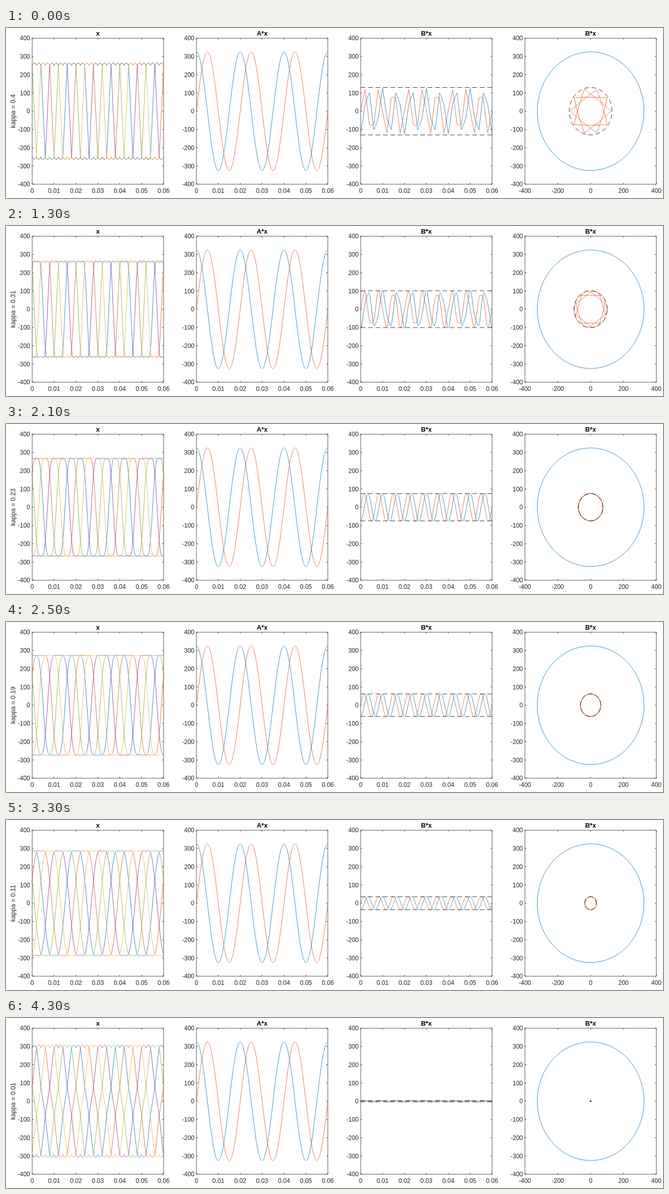
Recreate the animation shown at these times as an HTML page. Size 1280 by 333 pixels, loop 4400 ms.

```html
<!DOCTYPE html>
<html lang="en">
<head>
<meta charset="utf-8">
<title>Five-phase limits</title>
<style>
html, body { margin: 0; width: 100%; height: 100%; overflow: hidden; background: #fff; }
svg { display: block; width: 100vw; height: 100vh; }
text { font: 12px "Liberation Sans", Arial, sans-serif; fill: #262626; }
.title { font-weight: bold; font-size: 12.6px; fill: #000; }
.label { font-size: 12.6px; }
path { fill: none; stroke-width: .8; stroke-linejoin: round; }
.axis { stroke: #262626; stroke-linejoin: miter; }
.limit { stroke: #000; stroke-dasharray: 9 5.5; }
</style>
</head>
<body>
<svg id="stage" viewBox="0 0 1280 333"></svg>
<script>
const AMP = 325, N = 200, CYCLES = 3;
const TAU = 2 * Math.PI, SECTOR = TAU / 10;
const TOP = 20, MID = 163, BOTTOM = 306, WIDTH = 256;
const LEFT = [51, 371, 691, 1011];
const COLORS = ['#0072BD', '#D95319', '#EDB120', '#7E2F8E', '#77AC30'];
const PHASES = [0, 1, 2, 3, 4];
const stage = document.getElementById('stage');

function add(tag, attrs, text = '') {
  const el = document.createElementNS('http://www.w3.org/2000/svg', tag);
  for (const key in attrs) el.setAttribute(key, attrs[key]);
  el.textContent = text;
  return stage.appendChild(el);
}

const yPos = v => MID - v * 143 / 400;
const xPos = v => LEFT[3] + WIDTH / 2 + v * 0.32;
const polyline = pts => 'M' + pts.map(p => p[0].toFixed(2) + ' ' + p[1].toFixed(2)).join('L');

function ellipse(r) {
  const rx = r * 0.32, ry = r * 143 / 400;
  return `M${xPos(r)} ${MID}a${rx} ${ry} 0 1 0 ${-2 * rx} 0a${rx} ${ry} 0 1 0 ${2 * rx} 0`;
}

// Curve over time; samples hold one cycle and repeat.
function timePath(panel, value) {
  const pts = [];
  for (let i = 0; i <= N * CYCLES; i++)
    pts.push([LEFT[panel] + WIDTH * i / (N * CYCLES), yPos(value(i % N))]);
  return polyline(pts);
}

// Smallest peak of the five phases with no limit on B*x.
function freeSolution(theta) {
  const normal = (Math.floor(theta / SECTOR) + 0.5) * SECTOR;
  const dots = PHASES.map(k => Math.cos(TAU * k / 5 - normal));
  const sum = dots.reduce((s, d) => s + Math.abs(d), 0);
  const peak = AMP * Math.cos(theta - normal) / (0.4 * sum);
  return dots.map((d, k) => Math.abs(d) < 1e-6
    ? AMP * Math.sin(theta - normal) / 0.4 * Math.sin(TAU * k / 5 - normal)
    : peak * Math.sign(d));
}

function project(x) {
  let re = 0, im = 0;
  x.forEach((v, k) => {
    re += 0.4 * v * Math.cos(2 * TAU * k / 5);
    im += 0.4 * v * Math.sin(2 * TAU * k / 5);
  });
  return [re, im];
}

// Radius of the free B*x star at the middle of a sector.
const INNER = Math.hypot(...project(freeSolution(SECTOR / 2)));

// Phases for a B*x vector on the limit circle, centred about zero.
function onCircle(theta, r, phi) {
  const x = PHASES.map(k =>
    AMP * Math.cos(theta - TAU * k / 5) + r * Math.cos(phi - 2 * TAU * k / 5));
  const hi = Math.max(...x), lo = Math.min(...x);
  return { x: x.map(v => v - (hi + lo) / 2), peak: (hi - lo) / 2 };
}

function bestAngle(theta, r) {
  const peak = phi => onCircle(theta, r, phi).peak;
  const step = TAU / 60;
  let best = 0, least = Infinity;
  for (let i = 0; i < 60; i++) {
    const p = peak(i * step);
    if (p < least) { least = p; best = i * step; }
  }
  let lo = best - step, hi = best + step;
  for (let i = 0; i < 24; i++) {
    const third = (hi - lo) / 3;
    if (peak(lo + third) < peak(hi - third)) hi -= third;
    else lo += third;
  }
  return (lo + hi) / 2;
}

// Inside the star's inner radius the vector turns evenly, backwards at triple speed.
function solve(theta, r) {
  const x = freeSolution(theta), b = project(x);
  if (Math.hypot(...b) <= r) return { x, b };
  const phi = r < INNER ? Math.PI - 3 * theta : bestAngle(theta, r);
  return { x: onCircle(theta, r, phi).x, b: [r * Math.cos(phi), r * Math.sin(phi)] };
}

function drawAxes(panel, title) {
  const x0 = LEFT[panel], x1 = x0 + WIDTH;
  let d = `M${x0} ${TOP}H${x1}V${BOTTOM}H${x0}Z`;
  for (let v = -400; v <= 400; v += 100) {
    const y = yPos(v);
    d += `M${x0} ${y}h3M${x1} ${y}h-3`;
    add('text', { x: x0 - 4, y: y + 4.4, 'text-anchor': 'end' }, v);
  }
  const xy = panel === 3;
  const count = xy ? 4 : 6;
  for (let i = 0; i <= count; i++) {
    const x = x0 + WIDTH * i / count;
    d += `M${x} ${TOP}v3M${x} ${BOTTOM}v-3`;
    add('text', { x, y: 322.5, 'text-anchor': 'middle' }, xy ? i * 200 - 400 : i / 100);
  }
  add('path', { d, class: 'axis' });
  add('text', { x: x0 + WIDTH / 2, y: 15, 'text-anchor': 'middle', class: 'title' }, title);
}

['x', 'A*x', 'B*x', 'B*x'].forEach((title, i) => drawAxes(i, title));
const label = add('text', { transform: `translate(17.5 ${MID}) rotate(-90)`, 'text-anchor': 'middle', class: 'label' });

const curve = (i, d = '') => add('path', { stroke: COLORS[i], d });
const xCurves = PHASES.map(i => curve(i));
curve(0, timePath(1, i => AMP * Math.cos(TAU * i / N)));
curve(1, timePath(1, i => AMP * Math.sin(TAU * i / N)));
const bCurves = [curve(0), curve(1)];
curve(0, ellipse(AMP));
const orbit = curve(1);
const limits = [0, 1, 2].map(() => add('path', { class: 'limit' }));

const cache = {};
function pathsFor(percent) {
  if (cache[percent]) return cache[percent];
  const r = AMP * percent / 100;
  const cycle = Array.from({ length: N }, (_, i) => solve(TAU * i / N, r));
  return cache[percent] = {
    x: PHASES.map(k => timePath(0, i => cycle[i].x[k])),
    b: [0, 1].map(k => timePath(2, i => cycle[i].b[k])),
    orbit: polyline(cycle.map(({ b }) => [xPos(b[0]), yPos(b[1])])) + 'Z',
    limits: [...[r, -r].map(v => `M${LEFT[2]} ${yPos(v)}h${WIDTH}`), ellipse(r)]
  };
}

let shown = 0;
function show(percent) {
  if (percent === shown) return;
  shown = percent;
  const p = pathsFor(percent);
  label.textContent = 'kappa = ' + percent / 100;
  const set = (el, d) => el.setAttribute('d', d);
  xCurves.forEach((el, i) => set(el, p.x[i]));
  bCurves.forEach((el, i) => set(el, p.b[i]));
  limits.forEach((el, i) => set(el, p.limits[i]));
  set(orbit, p.orbit);
}

for (let p = 1; p <= 40; p++) pathsFor(p);
const start = performance.now();
function tick() {
  const t = (performance.now() - start) % 4400;
  show(40 - Math.max(0, Math.floor((t - 400) / 100)));
  requestAnimationFrame(tick);
}
tick();
</script>
</body>
</html>
```
